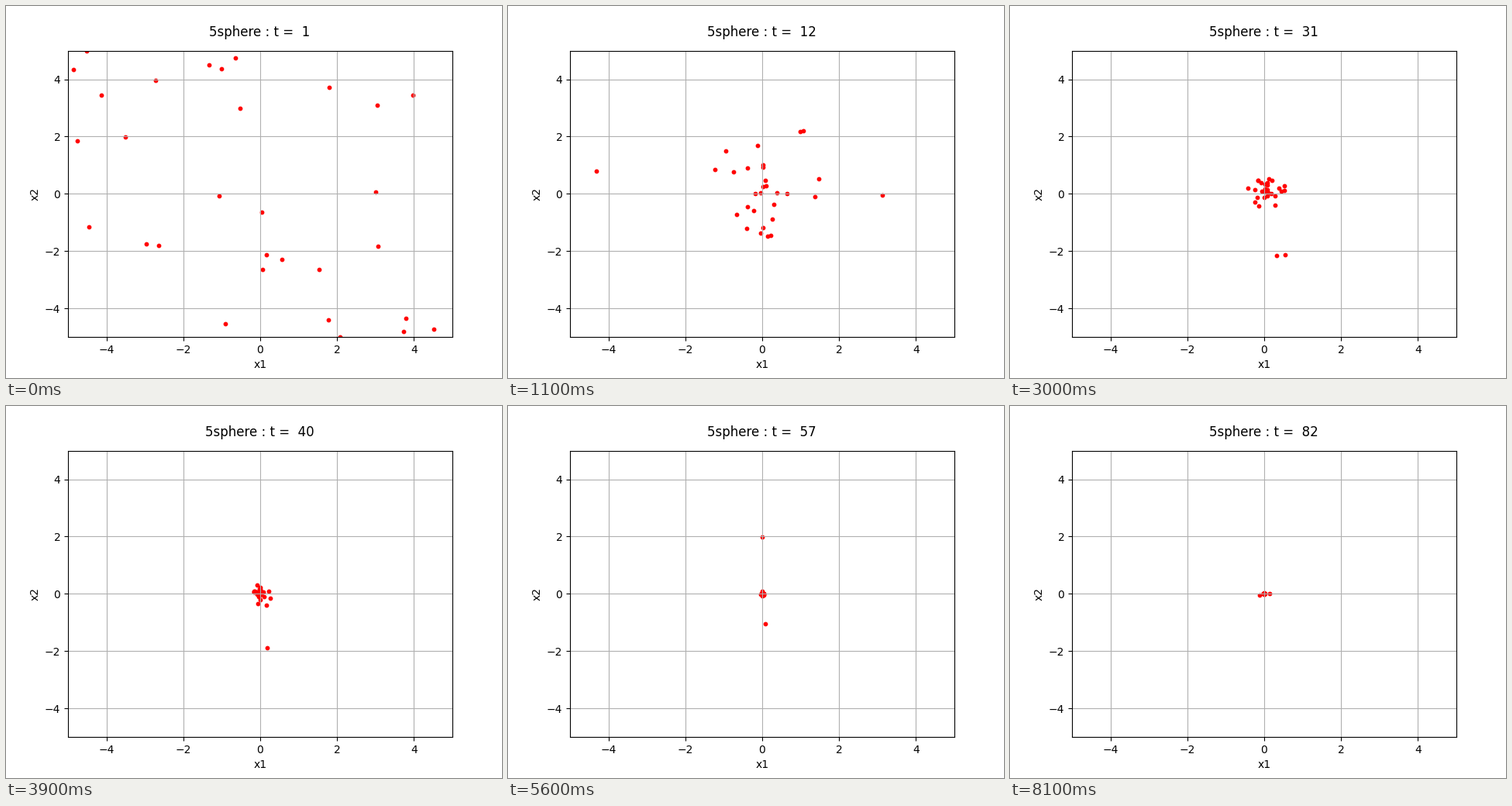
A matplotlib script for the animation above (8200 ms loop, 640x480 px).

```python
import matplotlib.pyplot as plt
import numpy as np
from matplotlib.animation import FuncAnimation

COUNT = 28
STEPS = 82
LIMIT = 5

# Each particle swings around the best point and is damped at its own pace.
rng = np.random.default_rng(5)
start = rng.uniform(-LIMIT, LIMIT, (COUNT, 2))
damping = rng.uniform(8, 17, (COUNT, 2))
rate = rng.uniform(.4, 1, (COUNT, 2))

# Two strays settle later than the rest.
stray_times = [1, 12, 22, 31, 49, 65, 82]
strays = [
    [(-4.76, 1.85), (-4.31, .80), (-.02, 3.61), (.54, -2.13),
     (-.02, 1.85), (.02, 2.11), (.14, 0)],
    [(4.52, -4.73), (3.13, -.05), (-.16, -3.02), (.32, -2.16),
     (.06, -1.61), (.12, -.46), (-.12, -.03)],
]


def bump(t, peak, width):
    return np.exp(-((t - peak) / width) ** 2)


def positions(t):
    age = t - 1
    best = np.array([.35 * bump(t, 22, 5), .1 * bump(t, 30, 16)])
    flock = best + start * np.exp(-age / damping) * np.cos(rate * age)
    late = [[np.interp(t, stray_times, axis) for axis in zip(*path)]
            for path in strays]
    return np.clip(np.vstack([flock, late]), -LIMIT, LIMIT)


fig, ax = plt.subplots(figsize=(6.4, 4.8), dpi=100)
ax.set(xlim=(-LIMIT, LIMIT), ylim=(-LIMIT, LIMIT), xlabel="x1", ylabel="x2")
ax.grid(True)
dots = ax.scatter(*positions(1).T, s=10, c="red")
title = ax.text(.499, 1.05, "", transform=ax.transAxes, ha="center",
                fontsize="large")


def update(frame):
    t = frame + 1
    dots.set_offsets(positions(t))
    title.set_text(f"5sphere : t =  {t}")
    return dots, title


anim = FuncAnimation(fig, update, frames=STEPS, interval=100, repeat=True,
                     repeat_delay=0)
plt.show()
```
